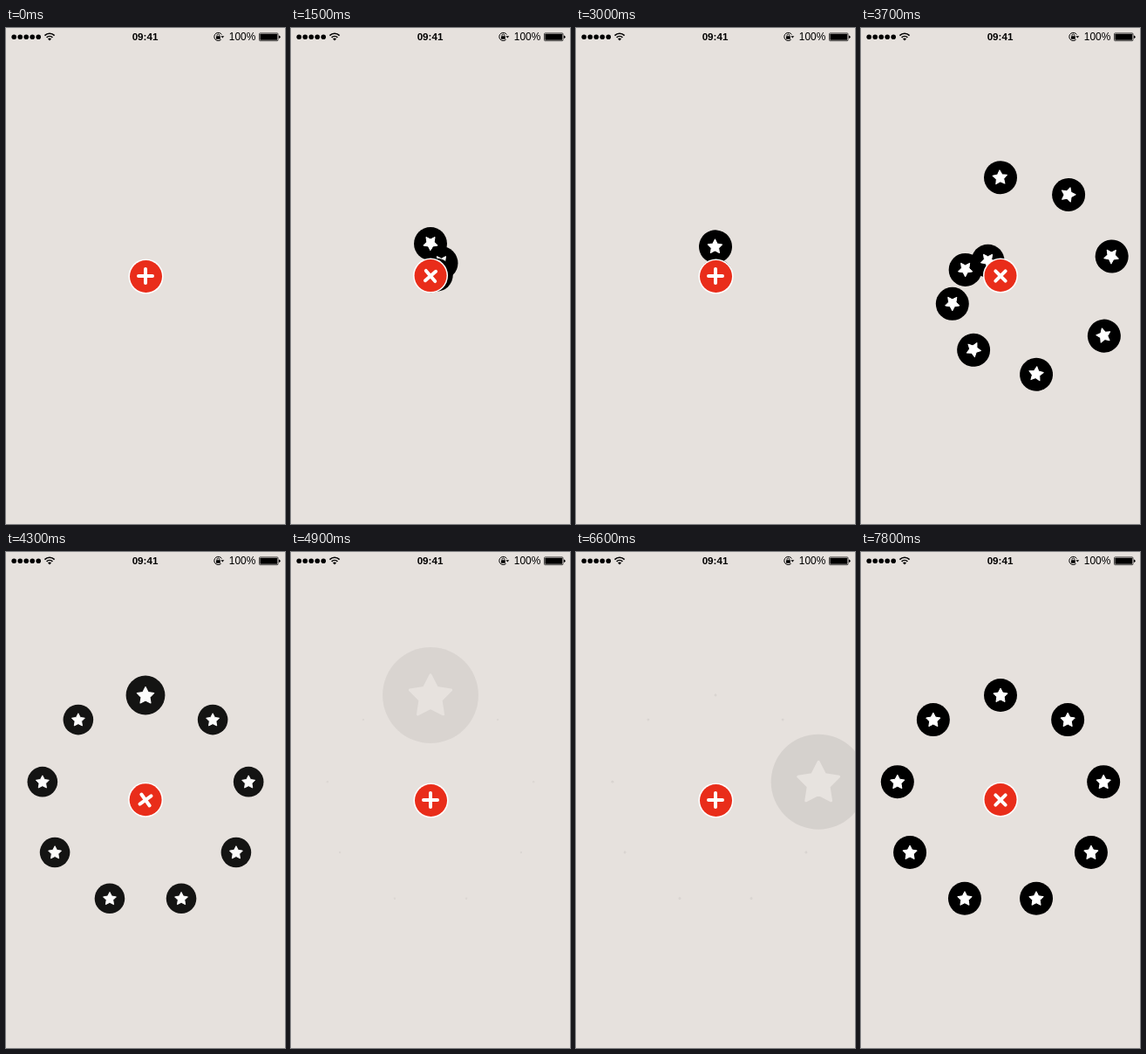
An HTML page for the animation above (8 s loop, 320 px wide and 568 px high).

```html
<!DOCTYPE html>
<html lang="en">
<head>
<meta charset="utf-8">
<title>Radial menu</title>
<style>
  html, body { margin: 0; width: 100%; height: 100%; overflow: hidden; background: #e6e1dd; }
  svg { display: block; width: 320px; height: 568px; }
  text { font-family: "Liberation Sans", Arial, sans-serif; }
</style>
</head>
<body>
<svg viewBox="0 0 320 568">
  <defs>
    <g id="item">
      <circle r="19"/>
      <path id="star" fill="#fff" stroke="#fff" stroke-linejoin="round"/>
    </g>
  </defs>
  <g id="bar">
    <g id="signal"></g>
    <g fill="none" stroke="#000" stroke-width="1.6">
      <path d="M44.4 8.6A8 8 0 0 1 55.6 8.6"/>
      <path d="M46.6 10.9A4.9 4.9 0 0 1 53.4 10.9"/>
    </g>
    <path d="M50 14.4L48 12.4A2.9 2.9 0 0 1 52 12.4Z"/>
    <text x="159.5" y="14.3" font-size="11.6" font-weight="700" text-anchor="middle">09:41</text>
    <path d="M247.4 7.6A4.6 4.6 0 1 0 246.6 13.3" fill="none" stroke="#000"/>
    <path d="M246.3 9.2H250.3L248.3 11.6Z"/>
    <rect x="241" y="9.3" width="4.8" height="3.5" rx=".4"/>
    <path d="M242 9.5V8.4A1.4 1.4 0 0 1 244.8 8.4V9.5" fill="none" stroke="#000" stroke-width=".9"/>
    <text x="255.8" y="14.3" font-size="11.9">100%</text>
    <rect x="290.5" y="5.9" width="21.5" height="8.8" rx="1" fill="none" stroke="#000" stroke-width=".7"/>
    <rect x="291.4" y="6.8" width="19.7" height="7" rx=".4"/>
    <path d="M312.9 8.6Q314.6 8.8 314.6 10.3T312.9 12Z"/>
  </g>
  <g id="items"></g>
  <g id="disc">
    <circle r="20" fill="#fff"/>
    <circle r="18.5" fill="#e92d1a"/>
  </g>
  <path id="plus" d="M-8 0H8M0 -8V8" stroke="#fff" stroke-width="4" stroke-linecap="round"/>
</svg>
<script>
const LOOP = 8000, COUNT = 9, CX = 160, CY = 284;
const STAGGER = 36, MOVE = 500, BURST = 700, TURN = 200;
const END = 120, FAR = 140, NEAR = 110;

// Taps: start time, action and, for a burst, the chosen item.
const TAPS = [
  [1343, "open"], [2213, "close"], [3284, "open"], [4237, "burst", 0],
  [5084, "open"], [5946, "burst", 2], [6896, "open"]
];

const $ = id => document.getElementById(id);
const clamp = v => Math.max(0, Math.min(1, v));
const lerp = (a, b, k) => a + (b - a) * k;

function add(parent, tag, attrs) {
  const node = document.createElementNS("http://www.w3.org/2000/svg", tag);
  for (const key in attrs) node.setAttribute(key, attrs[key]);
  return parent.appendChild(node);
}

// Cubic Bezier easing with y control values 0 and 1.
function bezier(x1, x2) {
  return x => {
    if (x <= 0 || x >= 1) return clamp(x);
    let lo = 0, hi = 1;
    for (let n = 0; n < 24; n++) {
      const s = (lo + hi) / 2, r = 1 - s;
      if (3 * r * r * s * x1 + 3 * r * s * s * x2 + s * s * s < x) lo = s;
      else hi = s;
    }
    return lo * lo * (3 - 2 * lo);
  };
}
const easeIn = bezier(.42, 1), easeInOut = bezier(.42, .58);

// Evenly timed linear steps through the given values.
function along(stops, p) {
  const k = p * (stops.length - 1);
  const n = Math.min(Math.floor(k), stops.length - 2);
  return lerp(stops[n], stops[n + 1], k - n);
}

const points = Array.from({ length: 10 }, (_, n) => {
  const a = n * Math.PI / 5, r = n % 2 ? 4.4 : 8.6;
  return (r * Math.sin(a)).toFixed(2) + " " + (.6 - r * Math.cos(a)).toFixed(2);
});
$("star").setAttribute("d", "M" + points.join("L") + "Z");
for (let n = 0; n < 5; n++) add($("signal"), "circle", { cx: 9.2 + 7 * n, cy: 10.3, r: 2.8 });
const items = Array.from({ length: COUNT }, () => add($("items"), "use", { href: "#item" }));

function pose(i, action, since, chosen) {
  if (action === "open") {
    const u = clamp((since - STAGGER * (i + 1)) / MOVE);
    return { dist: along([0, FAR, NEAR, END], easeIn(u)), turn: Math.min(180, 285 * (1 - u)) };
  }
  if (action === "close") {
    const p = easeIn(clamp((since - STAGGER * (COUNT - i)) / MOVE));
    const turn = p < .4 ? 360 * p / .4 : 360 * (1 - p) / .6;
    return { dist: along([END, FAR, 0], p), turn };
  }
  if (action === "burst" && since < BURST) {
    const q = since / BURST;
    return { dist: END, turn: 0, scale: lerp(1, i === chosen ? 3 : .01, q), alpha: 1 - q };
  }
  return { dist: 0, turn: 0, alpha: 0 };
}

function draw(t) {
  const [start, action, chosen] = TAPS.filter(tap => tap[0] <= t).pop() || [0, "idle"];
  const since = t - start;

  items.forEach((node, i) => {
    const { dist, turn, scale = 1, alpha = 1 } = pose(i, action, since, chosen);
    const a = i * 2 * Math.PI / COUNT;
    const x = CX + dist * Math.sin(a), y = CY - dist * Math.cos(a);
    node.setAttribute("transform", `translate(${x} ${y}) rotate(${turn}) scale(${scale})`);
    node.setAttribute("opacity", dist < .01 ? 0 : alpha);
  });

  const k = easeInOut(clamp(since / TURN));
  const open = action === "open" ? k : action === "idle" ? 0 : 1 - k;
  $("disc").setAttribute("transform", `translate(${CX + .5 - .5 * open} ${CY + .5 - open})`);
  $("plus").setAttribute("transform", `translate(${CX} ${CY}) rotate(${-45 * open})`);
}

let origin;
function tick(now) {
  origin ??= now;
  draw((now - origin) % LOOP);
  requestAnimationFrame(tick);
}
draw(0);
requestAnimationFrame(tick);
</script>
</body>
</html>
```
